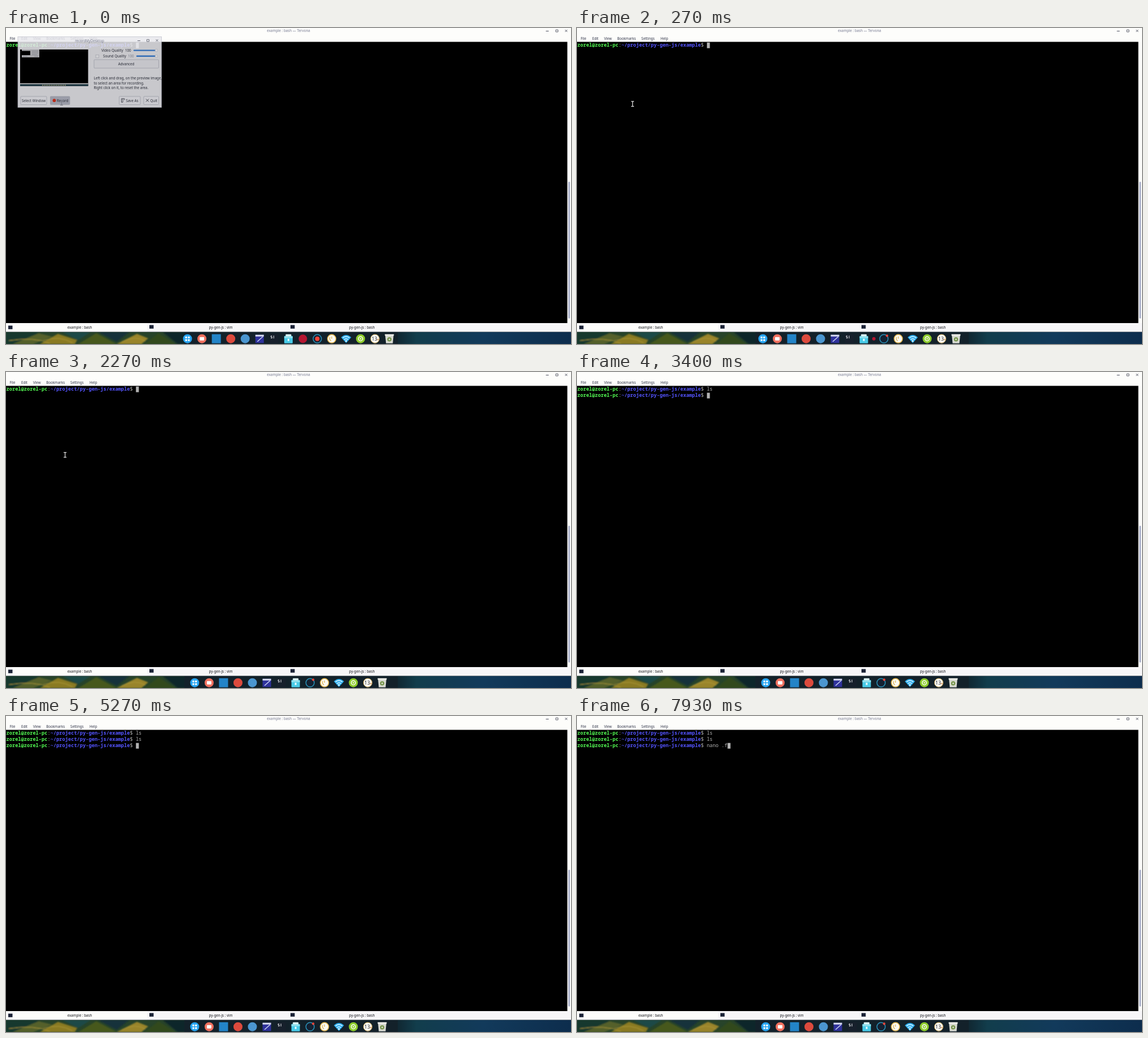
An HTML page for the animation above (8000 ms loop, 1001 by 559 pixels).

```html
<!DOCTYPE html>
<html lang="en">
<head>
<meta charset="utf-8">
<title>Terminal session</title>
<style>
  html, body { margin: 0; width: 100%; height: 100%; overflow: hidden; background: #000; }
  svg { display: block; width: 1001px; height: 559px; }
  text { font: 6.2px "Noto Sans", "Open Sans", sans-serif; white-space: pre; }
  .term text { font: 8.7px "Noto Sans Mono", "DejaVu Sans Mono", monospace; fill: #b2b2b2; }
  .term .user { font-weight: 700; fill: #54ff54; }
  .term .path { font-weight: 700; fill: #5454ff; }
</style>
</head>
<body>
<svg id="stage" viewBox="0 0 1001 559" xmlns="http://www.w3.org/2000/svg"></svg>
<script>
const LOOP = 8000, TICK = 1000 / 15;
const CELL = 5.22, ROW = 11, DOCK_STEP = 25.55, LEAVING = 8;

const rect = (x, y, w, h, fill, extra = '') =>
  `<rect x="${x}" y="${y}" width="${w}" height="${h}" fill="${fill}" ${extra}/>`;
const circle = (x, y, r, fill, extra = '') =>
  `<circle cx="${x}" cy="${y}" r="${r}" fill="${fill}" ${extra}/>`;
const line = (d, stroke, width = 1, extra = '') =>
  `<path d="${d}" fill="none" stroke="${stroke}" stroke-width="${width}" ${extra}/>`;
const label = (x, y, str, fill = '#32364a', anchor = 'start') =>
  `<text x="${x}" y="${y}" fill="${fill}" text-anchor="${anchor}">${str}</text>`;

const windowButtons = (xs, y, color) =>
  line(`M${xs[0] - 2.5},${y + .5}h5`, color) +
  line(`M${xs[1] - 2},${y - 1.7}h4v3.6h-4z`, color, .9) +
  line(`M${xs[2] - 2},${y - 2}l4,4m0,-4l-4,4`, color, .9);

function windowFrame() {
  const menu = [[6.5, 'File'], [27, 'Edit'], [48, 'View'], [71.3, 'Bookmarks'], [114, 'Settings'], [148, 'Help']];
  const tabs = ['example : bash', 'py-gen-js : vim', 'py-gen-js : bash'];
  return rect(0, 0, 1001, 538, '#fdfdfb') +
    label(500.5, 7.3, 'example : bash — Tervona', '#777b92', 'middle') +
    windowButtons([959, 976, 992.5], 5, '#4a4d5c') +
    menu.map(([x, name]) => label(x, 20.6, name)).join('') +
    rect(0, 24.5, 994.5, 497.5, '#000') +
    rect(996.3, 272, 2.8, 242, '#a6acc8', 'rx="1.4"') +
    rect(250, 522, 751, 15.5, '#f7f6f8') +
    tabs.map((name, i) =>
      rect(4 + 250 * i, i ? 525.5 : 526.5, 7.5, 6.3, '#1b2236') +
      label(130.5 + 250 * i, 532, name, '#15161c', 'middle')).join('');
}

function wallpaper() {
  const hills = [
    ['M0,538H60L25,559H0z', '#17382f'], ['M12,559L58,540L82,546L48,559z', '#55602a'],
    ['M60,559L92,541L126,552L122,559z', '#8a7a22'], ['M100,538H150L128,552z', '#1f4947'],
    ['M128,559L160,540L196,559z', '#46581f'], ['M164,538H218L196,555z', '#14313a'],
    ['M196,559L232,541L252,549L240,559z', '#99842a'], ['M246,559L270,540L300,559z', '#33491f'],
    ['M278,538H320V559H304z', '#11262a']
  ];
  return rect(0, 537.5, 1001, 21.5, '#13212a') +
    rect(0, 538, 322, 21, '#27432a') +
    `<g filter="url(#soft)" clip-path="url(#shelf)">${hills.map(([d, c]) => `<path d="${d}" fill="${c}"/>`).join('')}` +
    line('M5,553Q50,546 78,558M66,553Q94,543 118,557M205,555Q230,543 247,554', '#b09a3c', 1) + '</g>' +
    rect(690, 538, 311, 21, 'url(#sea)') +
    rect(316, 538, 378, 21, '#13212a');
}

function dialog() {
  const ink = '#30333f';
  const button = (x, y, w, h, fill) => rect(x, y, w, h, fill, 'rx="1" stroke="#aeb0bb" stroke-width=".7"');
  const slider = (x, y) =>
    line(`M${x},${y}H266`, '#3b7fd4', 2.4, 'stroke-linecap="round"') +
    circle(266.5, y, 2.4, '#f5f5f8', 'stroke="#b6b8c2" stroke-width=".5"');
  return rect(21, 15.5, 254.5, 125, '#e9e9ee', 'stroke="#b9bac6" stroke-width=".8"') +
    label(148, 24.6, 'recordMyDesktop', '#6a6e84', 'middle') +
    windowButtons([235.5, 251.5, 267.5], 22, '#4a4d5c') +
    rect(25, 38, 120.5, 64.5, '#000') +
    rect(28, 38, 31, 14, '#c3c3c8') + rect(28, 40.5, 15, 7.5, '#000') +
    line('M46,41h11M46,44h11M46,47h9M30,50h8M50,50h7', '#8b8d98', .7) +
    rect(25, 97.8, 120.5, 1.8, '#f0f0f4') + rect(25, 99.6, 120.5, 2.9, '#1c3c4a') +
    line('M64,101.2H107', '#d8c890', 1.5, 'stroke-dasharray="1.6 1.5"') +
    label(169, 42, 'Video Quality', ink) + label(211, 42, '100', ink) + slider(227, 39.6) +
    rect(159, 47.3, 5.5, 5.5, '#f0f0f4', 'stroke="#b6b8c2" stroke-width=".6"') +
    label(172, 52.3, 'Sound Quality', ink) + label(216, 52.3, '100', '#8e91a0') + slider(232, 49.8) +
    button(156, 56, 114.5, 15, '#e6e6ec') + label(213, 65.8, 'Advanced', ink, 'middle') +
    label(155.5, 91.2, 'Left click and drag, on the preview image,', ink) +
    label(155.5, 99.8, 'to select an area for recording.', ink) +
    label(155.5, 108.2, 'Right click on it, to reset the area.', ink) +
    button(26, 121, 46, 14.5, '#ececf1') + label(49, 130.5, 'Select Window', ink, 'middle') +
    button(78.5, 121, 34.5, 14.5, '#b4b6c4') + circle(85.5, 128.2, 2.9, '#d8341f') +
    label(90, 130.5, 'Record', ink) +
    button(200.5, 121, 37.5, 14.5, '#ececf1') + label(212.5, 130.5, 'Save As', ink) +
    line('M204.5,125h2.5v6.3h-2.5zM207,125h3v2.5', ink, .8) +
    button(244, 121, 26.5, 14.5, '#ececf1') + label(255.5, 130.5, 'Quit', ink) +
    line('M248,125.5l5,5m0,-5l-5,5', ink, .9);
}

// Each icon is drawn around its own centre.
const icons = [
  circle(0, 0, 8, '#27a5f2') + [[-4, -4], [.7, -4], [-4, .7], [.7, .7]].map(([x, y]) => rect(x, y, 3.3, 3.3, '#fff', 'rx=".8"')).join(''),
  circle(0, 0, 8, '#f0705f') + rect(-4, -3, 8, 6, '#fff', 'rx="1"'),
  rect(-8, -8, 16, 16, '#2384c8'),
  circle(0, 0, 8, '#dc4a3d'),
  circle(0, 0, 8, '#4b96d0'),
  rect(-7.5, -7, 15, 14.5, '#2f329c') + rect(-7.5, -7, 15, 3, '#d8dcf0') + line('M-4,5L6,-4', '#c9d2f2', 1.5),
  rect(-8, -8, 16, 16, '#17202c', 'rx="1.5"') + line('M-3.5,-5h-2v2h2v2h-2M-.5,-5.5v5', '#e4e6ea', 1),
  rect(-7.5, -5, 15, 13, '#48cbe8', 'rx="1"') + rect(-5, -8, 10, 4, '#d9f3f4', 'rx="1"') + rect(-7.5, -4, 15, 3, '#92e1ee') + rect(-1.5, 0, 3, 4, '#e9fbfd'),
  circle(0, 0, 7.5, '#b51631'),
  circle(0, 0, 7.4, '#142132', 'stroke="#2a91b8" stroke-width="1.5"') +
    `<g id="recDot">${circle(0, 0, 4, '#f04438')}</g><g id="recBadge">${circle(5.5, -5.3, 2.1, '#f04438')}</g>`,
  circle(0, 0, 7.4, '#fbfaf4', 'stroke="#e6b64a" stroke-width="1.5"') + line('M0,-4V0M-3,-3Q-5,1 -1,4', '#dfb24b', 1.2),
  '<path d="M0,7.5L-9,-2.5Q0,-11 9,-2.5z" fill="#2baef0"/>' + line('M-6,-1.5Q0,-6.5 6,-1.5M-3.6,1.5Q0,-1.5 3.6,1.5', '#e8f7ff', 1.5) + circle(0, 4, 1.4, '#fff'),
  circle(0, 0, 8, '#8dcc2b') + circle(0, 0, 3.7, 'none', 'stroke="#fff" stroke-width="1.5"') + circle(0, 0, 1.2, '#fff'),
  circle(0, 0, 7.6, '#fcfbf5', 'stroke="#d9b15c" stroke-width="1"') +
    '<text x="-1" y="3" text-anchor="middle" style="font-size:8.5px" fill="#242832">13</text>' + line('M4.2,3v-2.3h2v2.3', '#cc7b35', .8),
  '<path d="M-7.5,-7.5H7.5L6,8H-6z" fill="#d8dad2"/>' + rect(-8, -8, 16, 2.5, '#f0f0ec') + circle(0, 1, 3.8, '#76954b') + circle(0, 1, 1.5, '#d8dad2')
];

document.getElementById('stage').innerHTML = `
  <defs>
    <filter id="soft" x="-5%" y="-20%" width="110%" height="140%"><feGaussianBlur stdDeviation="1.3"/></filter>
    <clipPath id="shelf"><path d="M0,538H322V559H0z"/></clipPath>
    <linearGradient id="sea"><stop stop-color="#10252f"/><stop offset=".12" stop-color="#123d4c"/>
      <stop offset=".5" stop-color="#123a5b"/><stop offset="1" stop-color="#0d2d4d"/></linearGradient>
  </defs>
  ${windowFrame()}${wallpaper()}
  <g>${icons.map(icon => `<g class="icon">${icon}</g>`).join('')}</g>
  <g class="term" id="term"></g>
  <g id="dialog">${dialog()}</g>
  <g id="pointer">${line('M-2.5,-4.3H2.5M0,-4.3V4.3M-2.5,4.3H2.5', 'currentColor', 1.2)}</g>`;

const byId = id => document.getElementById(id);
const term = byId('term'), dialogBox = byId('dialog'), pointer = byId('pointer');
const dock = [...document.querySelectorAll('.icon')];
const show = (el, on) => el.setAttribute('visibility', on ? 'visible' : 'hidden');

const keys = [
  [2930, 'l'], [3130, 's'], [3400, '\n'],
  [4870, 'l'], [5070, 's'], [5270, '\n'],
  [6670, 'n'], [6800, 'a'], [6870, 'n'], [7000, 'o'], [7200, ' '], [7730, '.'], [7930, 'f']
];
const pointerPath = [[0, 98.5, 132], [133, 99, 130.5], [400, 98, 138], [800, 104.5, 146.5], [2200, 104.5, 146.5], [2400, 105, 147]];
const PROMPT = '<tspan class="user">zorel@zorel-pc</tspan>:<tspan class="path">~/project/py-gen-js/example</tspan>$ ';
const PROMPT_CELLS = 44;

function along(path, t) {
  const i = path.findIndex(p => p[0] > t);
  if (i < 0) return path[path.length - 1].slice(1);
  const [a, b] = [path[i - 1], path[i]], u = (t - a[0]) / (b[0] - a[0]);
  return [a[1] + (b[1] - a[1]) * u, a[2] + (b[2] - a[2]) * u];
}

function drawTerminal(t) {
  const rows = keys.filter(k => k[0] <= t).map(k => k[1]).join('').split('\n');
  const last = rows.length - 1;
  term.innerHTML = rows.map((cmd, i) => `<text x=".5" y="${33.3 + ROW * i}">${PROMPT}${cmd}</text>`).join('') +
    rect(.5 + CELL * (PROMPT_CELLS + rows[last].length), 25.7 + ROW * last, CELL, 10, '#b2b2b2');
}

function drawDock(t) {
  const u = Math.min(1, Math.max(0, (t - 133) / 498));
  const closed = 1 - (1 - u) ** 3;
  dock.forEach((icon, i) => {
    const slot = i - (i > LEAVING ? closed : i === LEAVING ? closed / 2 : 0) - (14 - closed) / 2;
    const size = i === LEAVING ? 1 - closed : 1;
    icon.setAttribute('transform', `translate(${500.4 + DOCK_STEP * slot},549.7) scale(${size})`);
  });
  show(dock[LEAVING], closed < .85);
  show(byId('recDot'), t < 130);
  show(byId('recBadge'), t >= 130);
}

function drawDialog(t) {
  const closing = t >= 130;
  show(dialogBox, t < 195);
  dialogBox.setAttribute('opacity', closing ? .08 : .86);
  dialogBox.setAttribute('transform', `translate(148.3,78) scale(${closing ? .86 : 1}) translate(-148.3,-78)`);
}

function drawPointer(t) {
  const [x, y] = along(pointerPath, t);
  show(pointer, t < 2925);
  pointer.setAttribute('transform', `translate(${x},${y})`);
  pointer.setAttribute('color', t < 130 ? '#7b7d88' : '#e4e4e4');
}

function render(ms) {
  const t = Math.floor((ms + 4) / TICK) * TICK;
  drawTerminal(ms);
  drawDock(t);
  drawDialog(t);
  drawPointer(t);
}

const start = performance.now();
function frame() {
  render((performance.now() - start) % LOOP);
  requestAnimationFrame(frame);
}
frame();
</script>
</body>
</html>
```
